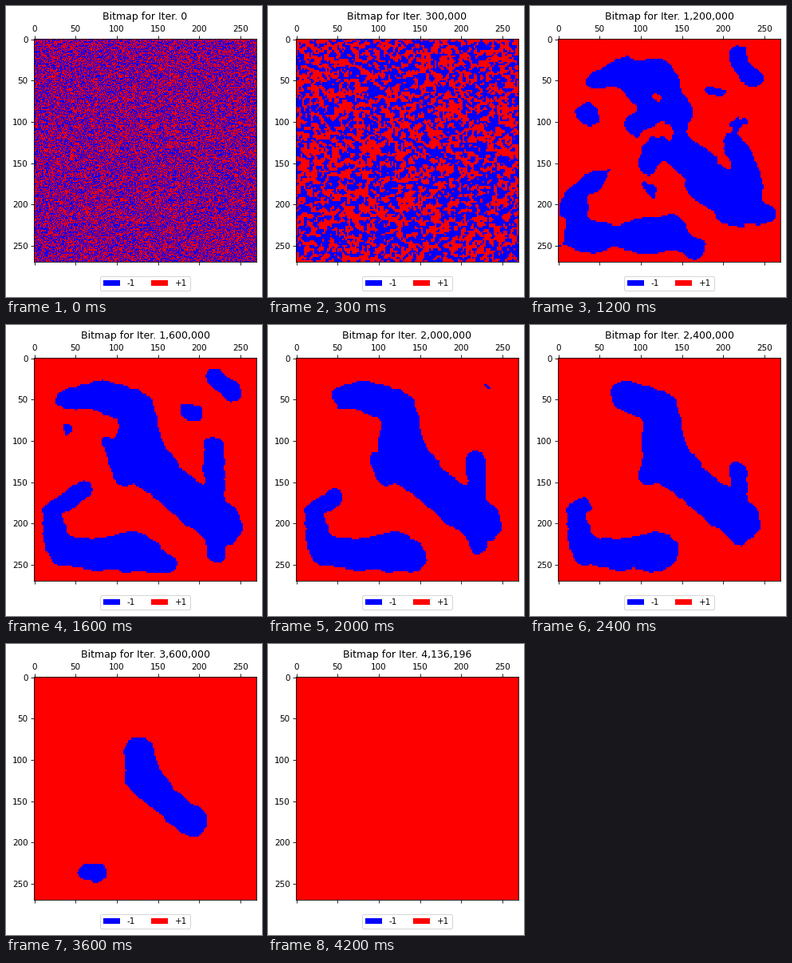
A matplotlib script for the animation above (4.3 s loop, 321 by 364 pixels).

```python
import numpy as np
import matplotlib.pyplot as plt
from matplotlib.animation import FuncAnimation
from matplotlib.colors import ListedColormap
from matplotlib.patches import Patch

W, H, DPI = 321, 364, 64
N, BLOCK = 270, 2
LEFT, TOP, SIDE = 35, 41, 279
FRAMES, STEP, LAST = 43, 100_000, 4_136_196
SETTLED = 16  # step at which the noise has merged into a few worms

# Block centres in stage pixels; the worms below use the same units.
centres = (np.arange(N // BLOCK) + 0.5) * BLOCK * SIDE / N
X, Y = np.meshgrid(LEFT + centres, TOP + centres)


def blur(field, sigma):
    freq = np.fft.fftfreq(len(field))
    gain = np.exp(-2 * (np.pi * sigma * freq) ** 2)
    return np.fft.ifft2(np.fft.fft2(field) * np.outer(gain, gain)).real


def unit(field):
    return field / field.std()


def worm(n, path, times, start, stop, size):
    """Signed distance to a worm that retracts along its (x, y, radius) path.

    start and stop are positions along the path, size scales the radius.
    """
    start, stop, size = (np.interp(n, times, v) for v in (start, stop, size))
    k = np.linspace(start, stop, 40)
    x, y, r = (np.interp(k, range(len(path)), c)[:, None, None]
               for c in zip(*path))
    return np.max(size * r - np.hypot(X - x, Y - y), axis=0)


def island(a, b, end):
    """Short worm that only shrinks, gone at the given step."""
    return [a, b], (SETTLED, end), (0, 0), (1, 1), (1, -0.1)


WORMS = [
    # main body
    ([(70, 93, 9), (118, 88, 18), (163, 105, 22), (170, 165, 30),
      (205, 200, 24), (270, 250, 26)],
     (16, 24, 31, 36, 39, 41, 42),
     (0, 1, 1.8, 2.5, 2.9, 3.2, 3.2),
     (5, 4.9, 4.7, 4.45, 3.9, 3.4, 3.4),
     (1.05, 1, 0.9, 0.75, 0.6, 0.36, -1)),
    # its right arm and left spur
    ([(260, 153, 13), (264, 287, 11)],
     (16, 24, 31), (0, 0.22, 0.55), (1, 0.85, 0.6), (1, 0.8, -0.1)),
    ([(127, 147, 8), (150, 190, 12)],
     (16, 24, 31), (0, 0.9, 1), (1, 1, 1), (1, 0.9, -0.1)),
    # lower hook
    ([(98, 205, 11), (56, 232, 11), (68, 282, 18), (120, 287, 20),
      (160, 283, 25), (205, 299, 10)],
     (16, 24, 31, 36, 39),
     (0, 0.75, 2.25, 2.65, 2.7),
     (5, 4.05, 3.3, 2.9, 2.8),
     (1, 0.97, 0.94, 0.6, -0.3)),
    island((262, 66, 11), (283, 84, 12), 21),
    island((224, 107, 8), (238, 112, 10), 19),
    island((77, 128, 6), (77, 133, 6), 18),
]

rng = np.random.default_rng(7)
grain = rng.standard_normal((N, N))
wobble = 0.9 * unit(blur(rng.standard_normal(X.shape), 1.5))


def worm_field(n):
    field = np.max([worm(n, *w) for w in WORMS], axis=0)
    return blur(np.clip(field, -12, 12), 1.2) + wobble


def spins(n):
    """Grid of -1 and +1: noise coarsens into worms, which then retract."""
    if n == 0:
        return np.where(grain > 0, -1, 1)
    field = worm_field(max(n, SETTLED))
    if n < SETTLED:
        u = (n / SETTLED) ** 1.7
        noise = unit(blur(grain, 1.3 * (n / 3) ** 1.5))
        field = (1 - u) * noise[::BLOCK, ::BLOCK] + u * field / 12
    return np.kron(np.where(field > 0, -1, 1), np.ones((BLOCK, BLOCK)))


def pt(px):
    return px * 72 / DPI


fig = plt.figure(figsize=(W / DPI, H / DPI), dpi=DPI, facecolor="white")
ax = fig.add_axes([LEFT / W, 1 - (TOP + SIDE) / H, SIDE / W, SIDE / H])
image = ax.imshow(spins(0), cmap=ListedColormap(["blue", "red"]),
                  vmin=-1, vmax=1, interpolation="nearest", aspect="auto")
ax.set_xticks(range(0, N, 50))
ax.set_yticks(range(0, N, 50))
ax.tick_params(labelsize=pt(10.42), length=pt(3.65), width=pt(0.83),
               pad=pt(3.65))
ax.tick_params(axis="x", top=True, bottom=True, labeltop=True,
               labelbottom=False)
for spine in ax.spines.values():
    spine.set_linewidth(pt(0.83))

title = fig.text((LEFT + SIDE / 2) / W, 1 - 17 / H, "", ha="center",
                 va="baseline", fontsize=pt(12.5))
legend = fig.legend(
    handles=[Patch(facecolor=c, linewidth=0, label=s)
             for c, s in (("blue", "-1"), ("red", "+1"))],
    loc="center", bbox_to_anchor=(174.3 / W, 1 - 347.3 / H), ncol=2,
    fontsize=pt(10.42))
legend.get_frame().set_linewidth(pt(1.04))


def update(n):
    image.set_data(spins(n))
    title.set_text(f"Bitmap for Iter. {min(n * STEP, LAST):,}")
    return image, title


anim = FuncAnimation(fig, update, frames=FRAMES, interval=100, repeat=True,
                     repeat_delay=0)
plt.show()
```
